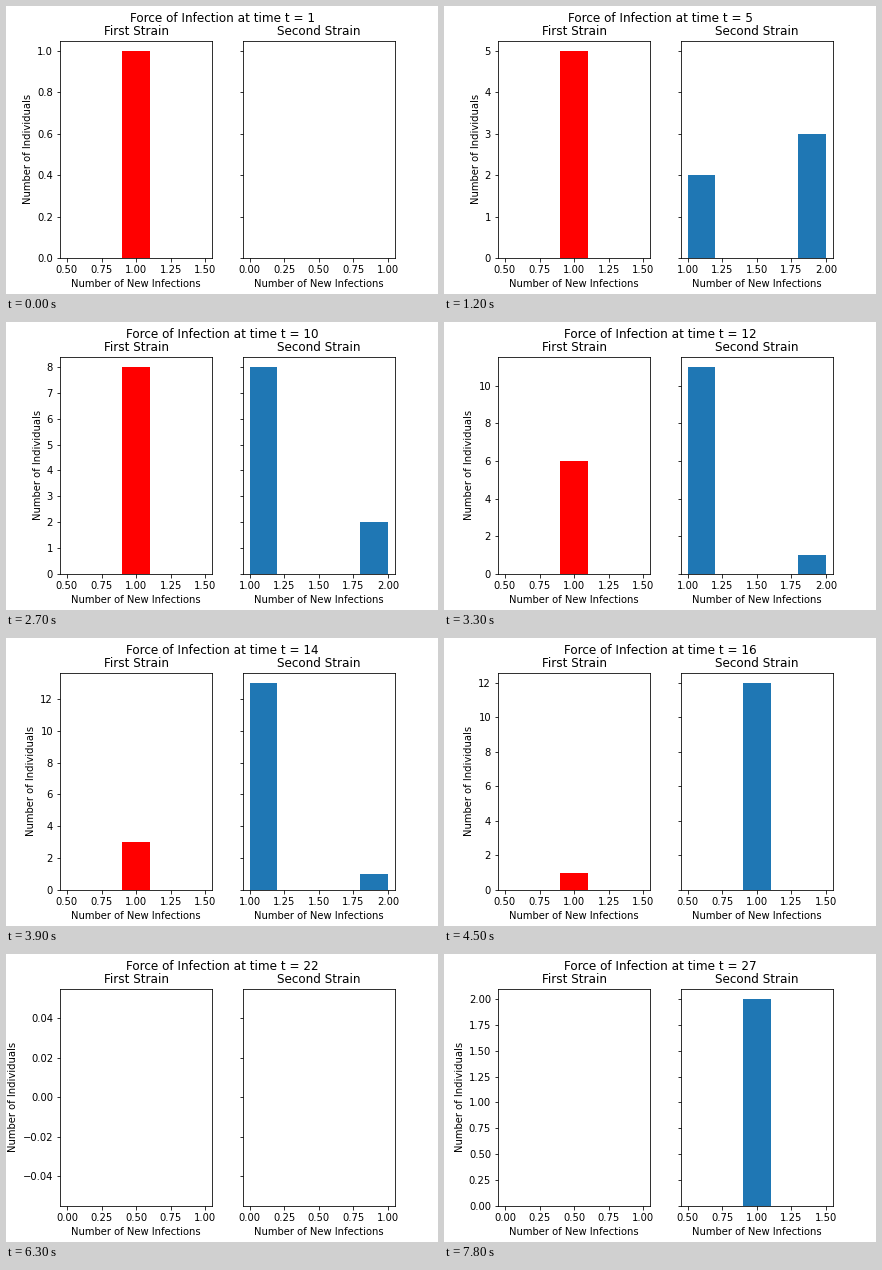
Write a matplotlib script that moves like this. It is 432 px wide and 288 px high and loops after 8000 ms.

```python
import matplotlib.pyplot as plt
import numpy as np
from matplotlib.animation import FuncAnimation

plt.rcParams.update({
    "font.family": "DejaVu Sans",
    "font.size": 10,
    "figure.subplot.bottom": 0.125,
})

INTERVAL = 100       # ms
TICKS_PER_STEP = 3   # each time step stays for 300 ms
FRAMES = 80

# Individuals causing one / two new infections, per time step
FIRST_ONE = [1, 2, 3, 4, 5, 6, 6, 7, 8, 8, 7, 6, 5, 3, 2, 1, 1]
FIRST_TWO = [0, 0, 0, 0, 0, 0, 1, 1, 1]
SECOND_ONE = [0, 2, 2, 2, 2, 3, 4, 5, 6, 8, 11, 11, 12, 13, 14,
              12, 8, 5, 3, 2, 1, 0, 1, 1, 1, 2, 2]
SECOND_TWO = [0, 0, 1, 2, 3, 3, 3, 3, 3, 2, 0, 1, 1, 1, 1]


def count(series, step):
    return series[step] if step < len(series) else 0


def infections(ones, twos, step):
    return np.repeat([1, 2], [count(ones, step), count(twos, step)])


def draw(frame):
    step = frame // TICKS_PER_STEP
    fig.clear()
    axes = fig.subplots(1, 2, sharey=True)
    panels = [
        ("First Strain", FIRST_ONE, FIRST_TWO, "red"),
        ("Second Strain", SECOND_ONE, SECOND_TWO, "tab:blue"),
    ]
    for ax, (title, ones, twos, color) in zip(axes, panels):
        ax.hist(infections(ones, twos, step), bins=5, color=color)
        ax.set_title(title)
        ax.set_xlabel("Number of New Infections")
    axes[0].set_ylabel("Number of Individuals")
    fig.suptitle(f"Force of Infection at time t = {step + 1}")
    return []


fig = plt.figure(figsize=(6, 4), dpi=72, facecolor="white")
anim = FuncAnimation(fig, draw, frames=FRAMES, interval=INTERVAL,
                     repeat=True, repeat_delay=0)
plt.show()
```
